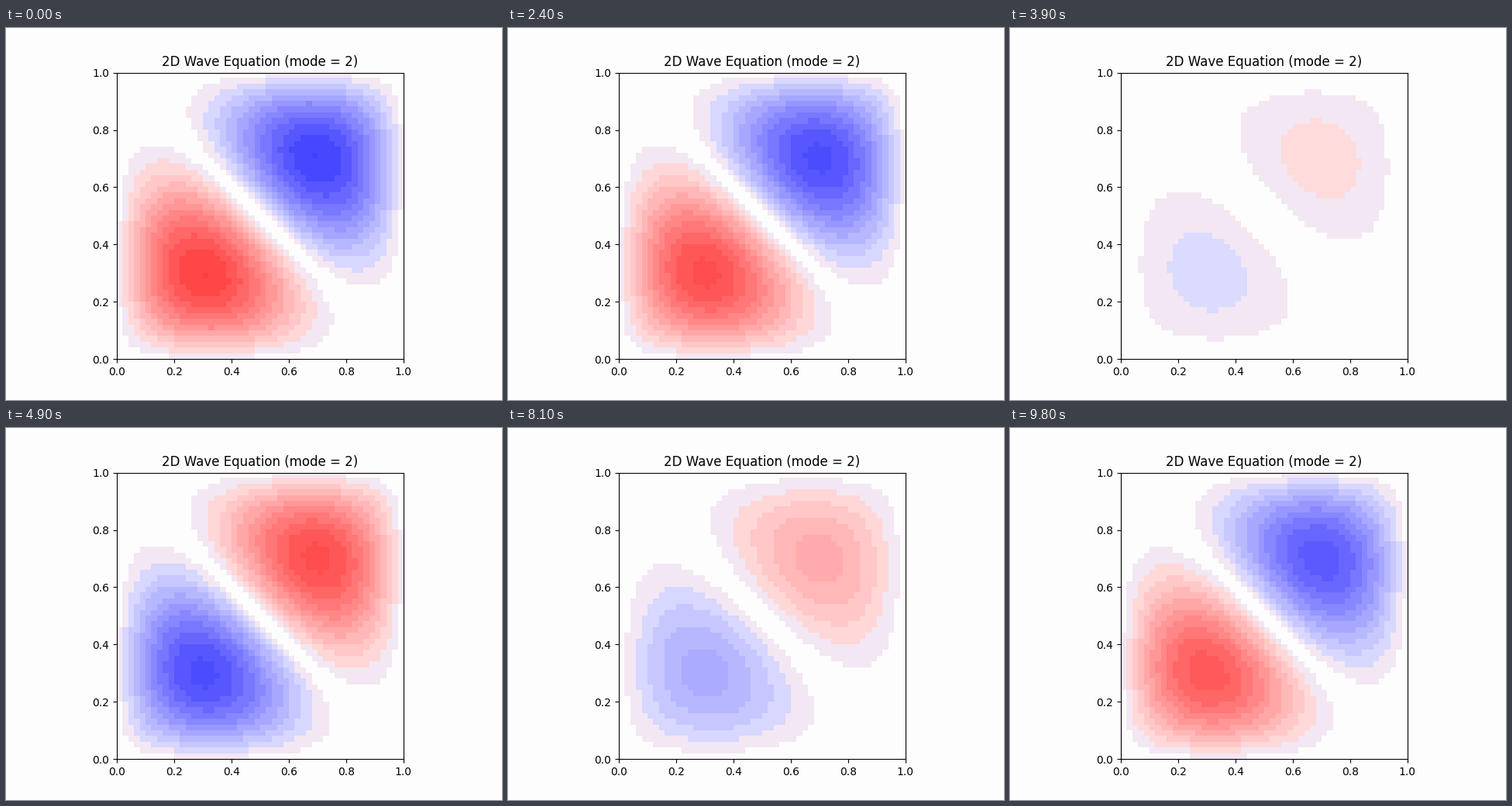
Write a matplotlib script that moves like this. It is 640 px wide and 480 px high and loops after 9900 ms.

```python
import matplotlib.pyplot as plt
import numpy as np
from matplotlib.animation import FuncAnimation

N = 50            # interior grid points per side
FRAMES = 99
INTERVAL = 100    # ms
PERIOD = 100      # frames per oscillation
PEAK = 11.5       # frame position of the largest swing
BANDS = 16        # colour steps on each side of zero
TILT = 0.0026     # slight imbalance between the two degenerate modes
PAPER = np.full(3, 253 / 255)


def mode_shape():
    s = np.arange(1, N + 1) * np.pi / (N + 1)
    x, y = np.meshgrid(s, s)
    u = ((1 - TILT) * np.sin(2 * x) * np.sin(y)
         + (1 + TILT) * np.sin(x) * np.sin(2 * y))
    return u / np.abs(u).max()


def banded(u):
    """Red-white-blue colours, one mean tone per band of amplitude."""
    size = np.abs(u)
    band = np.minimum((size * BANDS).astype(int), BANDS - 1)
    rgb = np.empty(u.shape + (3,))
    rgb[band == 0] = PAPER
    for k in range(1, band.max() + 1):
        cells = band == k
        if not cells.any():
            continue
        tone = 1 - size[cells].mean()
        if k == 1:
            # both signs share one lavender in the faintest band
            mid = (1 + tone) / 2
            rgb[cells] = mid, tone, mid
        else:
            rgb[cells & (u > 0)] = 1, tone, tone
            rgb[cells & (u < 0)] = tone, tone, 1
    return rgb


shape = mode_shape()


def field(i):
    return banded(shape * np.cos(2 * np.pi * (i - PEAK) / PERIOD))


fig, ax = plt.subplots(figsize=(6.4, 4.8), dpi=100, facecolor=PAPER)
ax.set_facecolor(PAPER)
image = ax.imshow(field(0), origin="lower", extent=(0, 1, 0, 1),
                  interpolation="nearest")
ax.set_title("2D Wave Equation (mode = 2)")


def update(i):
    image.set_data(field(i))
    return (image,)


anim = FuncAnimation(fig, update, frames=FRAMES, interval=INTERVAL,
                     repeat=True, repeat_delay=0, blit=False)
plt.show()
```
